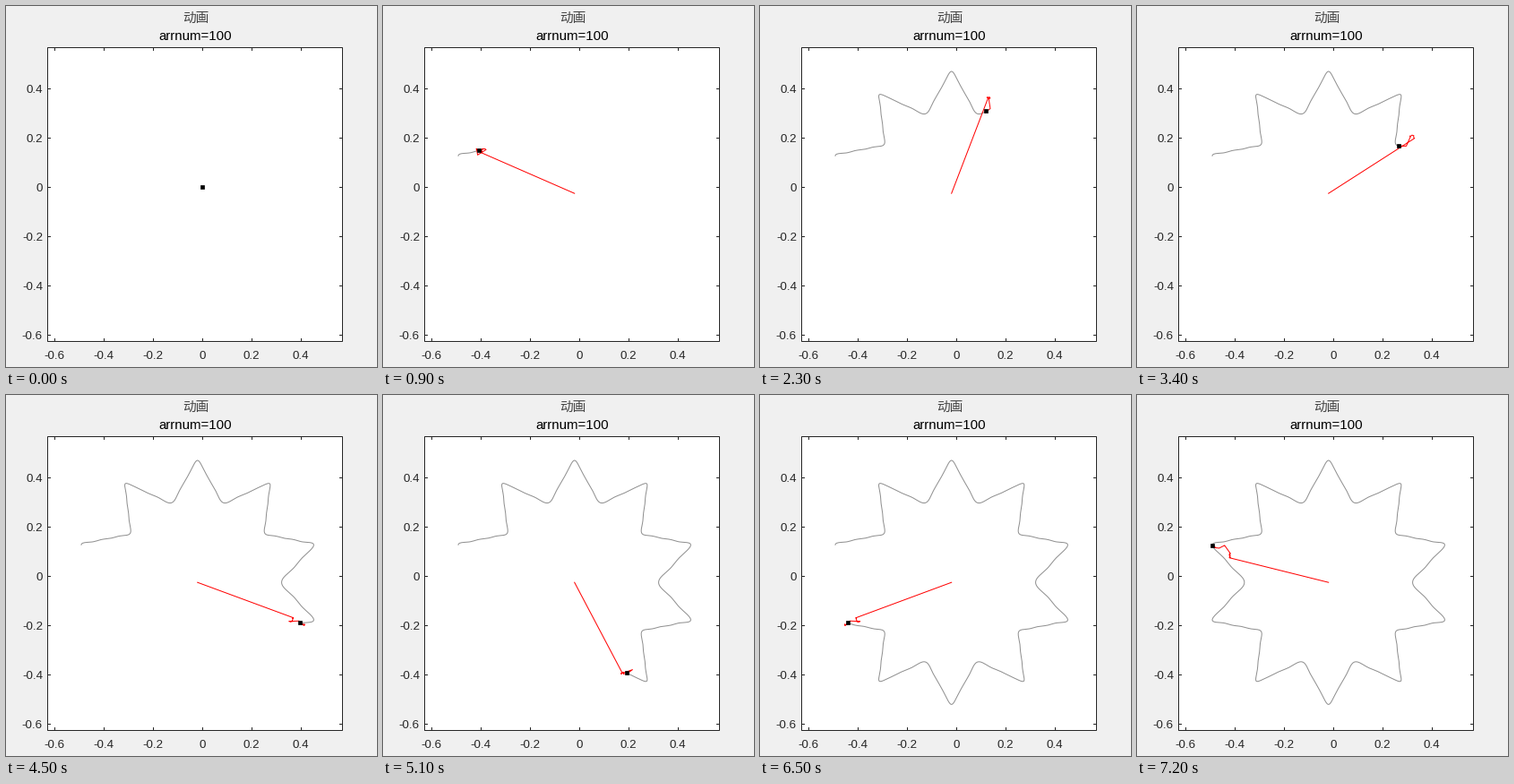
Animation of 414 by 403 pixels, one loop 7.7 s. Source, as a matplotlib script:

```python
import numpy as np
import matplotlib.pyplot as plt
from matplotlib.animation import FuncAnimation
from matplotlib.patches import Rectangle

W, H, DPI = 414, 403, 64
PX = 72 / DPI                       # one pixel in points
LEFT, RIGHT, TOP, BOTTOM = 46, 375, 46, 374
X0, Y0, UNIT = 219, 202, 275        # plot origin and scale in pixels
DARK = "#262626"
N, ARMS = 1000, 100
PEN = 4.7

# Phase of the drawing arm at chosen frames, linear in between
KEY_FRAMES = [8, 15, 23, 31, 34, 39, 45, 47, 55, 57, 63, 71, 72]
KEY_PHASES = [.0125, .0985, .2675, .345, .3685, .431, .5155,
              .556, .708, .758, .875, .986, .998]


def star(center, outer, inner, points=10):
    """Closed star outline, sampled evenly in pixel steps."""
    k = np.arange(2 * points + 1)
    radius = np.where(k % 2 == 0, outer, inner)
    corners = center + radius * np.exp(1j * np.radians(198 + 180 / points * k))
    side = np.diff(corners)
    steps = np.maximum(abs(side.real), abs(side.imag))
    length = np.concatenate([[0], np.cumsum(steps)])
    return np.interp(np.arange(N) / N * length[-1], length, corners)


coef = np.fft.fft(star(213.2 + 208.7j, 138.4, 91.8)) / N
freq = np.fft.fftfreq(N, 1 / N)
order = np.argsort(abs(freq), kind="stable")[1:ARMS + 1]   # 1, -1, 2, -2, ...


def joints(phase):
    """Joints of the arm chain; the last one is the pen."""
    arms = coef[order] * np.exp(2j * np.pi * freq[order] * phase)
    return coef[0] + np.concatenate([[0], np.cumsum(arms)])


grid = np.arange(N) / N
curve = np.array([joints(p)[-1] for p in grid])

fig = plt.figure(figsize=(W / DPI, H / DPI), dpi=DPI, facecolor="#f0f0f0")
ax = fig.add_axes([0, 0, 1, 1])
ax.set_xlim(-.5, W - .5)
ax.set_ylim(H - .5, -.5)
ax.axis("off")


def line(xs, ys, color=DARK, **kw):
    return ax.plot(xs, ys, color=color, lw=PX, snap=False, **kw)[0]


def label(x, y, text, size, color=DARK, ha="center", font="Liberation Sans"):
    ax.text(x, y, text, fontsize=size * PX, color=color, ha=ha,
            va="baseline", family=font)


ax.add_patch(Rectangle((LEFT, TOP), RIGHT - LEFT, BOTTOM - TOP, fc="white",
                       ec=DARK, lw=PX, snap=False, zorder=0))
for i in range(-3, 3):
    text = f"{i / 5:.1f}" if i else "0"
    x, y = X0 + i * UNIT / 5, Y0 - i * UNIT / 5
    for a, b in ((TOP, TOP + 3), (BOTTOM - 3, BOTTOM)):
        line([x, x], [a, b])
    for a, b in ((LEFT, LEFT + 3), (RIGHT - 3, RIGHT)):
        line([a, b], [y, y])
    label(x - .6, 394, text, 13.33)
    label(40.4, y + 4.6, text, 13.33, ha="right")
label(211, 17, "动画", 14.67, "#444444", font="Noto Sans CJK JP")
label(210.5, 38, "arrnum=100", 15, "black")

trace = line([], [], "#8f8f8f", zorder=3)
chain = line([], [], "red", zorder=4, solid_joinstyle="round")
pen = ax.add_patch(Rectangle((0, 0), PEN, PEN, fc="black", ec="none",
                             snap=False, zorder=5))


def put(artist, z):
    artist.set_data(z.real, z.imag)


def draw(frame):
    if frame < KEY_FRAMES[0]:
        put(trace, curve[:0])
        put(chain, curve[:0])
        tip = X0 + 1j * Y0
    else:
        phase = np.interp(frame, KEY_FRAMES, KEY_PHASES)
        arm = joints(phase)
        tip = arm[-1]
        put(trace, np.append(curve[grid < phase], tip))
        put(chain, arm)
    pen.set_xy((round(tip.real) - PEN / 2, round(tip.imag) - PEN / 2))
    return trace, chain, pen


anim = FuncAnimation(fig, draw, frames=77, interval=100, repeat=True,
                     init_func=lambda: draw(0))
plt.show()
```
